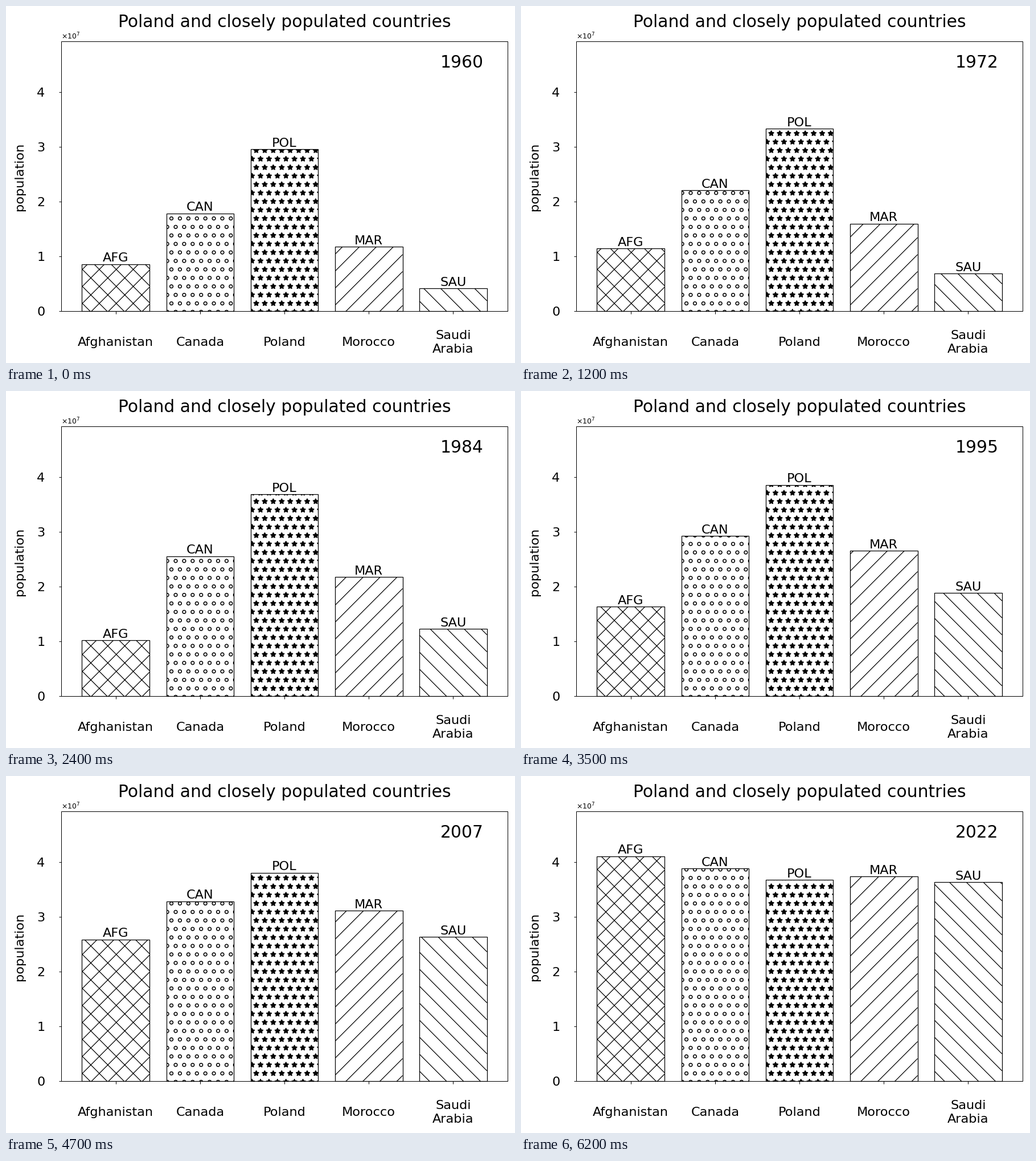
A matplotlib script that plays this animation: 894x626 px, repeating every 6300 ms.

```python
import matplotlib.pyplot as plt
import numpy as np
from matplotlib.animation import FuncAnimation
from matplotlib.patches import PathPatch, Rectangle
from matplotlib.path import Path

W, H, DPI = 894, 626, 64
SCALE = 89.4               # pixels per inch of the layout
PT = SCALE / DPI           # layout points to figure points
LEFT, RIGHT, TOP, BASE = 97.4, 880.9, H - 61.7, H - 535.35
FIRST_BAR, STEP, BAR_W = 133.35, 148.2, 118.6
PER_MILLION = 9.6
CELL = SCALE / 6           # spacing of the hatch grid
FIRST_YEAR, FRAMES = 1960, 63
KEY_YEARS = [1960, 1966, 1977, 1984, 1995, 2007, 2015, 2022]


def smooth(x, xs, ys):
    """Monotone cubic through the points, flat at their peaks and dips."""
    xs, ys = np.array(xs, float), np.array(ys, float)
    slope = np.diff(ys) / np.diff(xs)
    a, b = slope[:-1], slope[1:]
    same = a * b > 0
    inner = np.where(same, 2 * a * b / np.where(same, a + b, 1), 0)
    tangent = np.concatenate([slope[:1], inner, slope[-1:]])
    i = np.clip(np.searchsorted(xs, x, side="right") - 1, 0, len(xs) - 2)
    step = xs[i + 1] - xs[i]
    t = (x - xs[i]) / step
    ease = t * t * (3 - 2 * t)
    return (ys[i] + (ys[i + 1] - ys[i]) * ease
            + step * t * (1 - t) * ((1 - t) * tangent[i] - t * tangent[i + 1]))


def diagonals(left, slope):
    """Parallel 45 degree lines over the whole column."""
    x = np.array([left, left + BAR_W])
    lines = []
    for k in range(-40, 70):
        y = H + slope * x - 2 * CELL * k
        if y.max() > BASE and y.min() < TOP:
            lines.append(Path(np.column_stack([x, y])))
    return lines


def grid_of(left, shape, radius):
    """Copies of a unit shape on a staggered grid."""
    first, last = int(left / CELL) - 1, int((left + BAR_W) / CELL) + 2
    copies = []
    for row in range(4, 37):
        for col in range(first, last):
            center = ((col + row % 2 / 2) * CELL, H - row * CELL)
            copies.append(Path(shape.vertices * radius + center, shape.codes))
    return copies


def slashes(left):
    return diagonals(left, 1)


def backslashes(left):
    return diagonals(left, -1)


def crosses(left):
    return slashes(left) + backslashes(left)


def rings(left):
    return grid_of(left, Path.unit_circle(), 0.19 * CELL)


def stars(left):
    return grid_of(left, Path.unit_regular_star(5), CELL / 3)


# name, code, millions in the key years, further turning points, pattern
COUNTRIES = [
    ("Afghanistan", "AFG", [8.6, 9.8, 12.7, 10.2, 16.4, 25.9, 33.8, 41.1],
     {1979: 13, 1982: 10, 1991: 10.7, 2002: 21}, crosses),
    ("Canada", "CAN", [17.9, 20, 23.7, 25.6, 29.3, 32.9, 35.7, 38.9],
     {}, rings),
    ("Poland", "POL", [29.6, 31.7, 34.7, 36.9, 38.6, 38.1, 38, 36.8],
     {}, stars),
    ("Morocco", "MAR", [11.8, 13.7, 18.2, 21.8, 26.6, 31.2, 34.6, 37.4],
     {}, slashes),
    ("Saudi\nArabia", "SAU", [4.2, 5.2, 8.7, 12.3, 18.9, 26.4, 32.7, 36.4],
     {}, backslashes),
]

plt.rcParams["font.family"] = "DejaVu Sans"
fig = plt.figure(figsize=(W / DPI, H / DPI), dpi=DPI, facecolor="white")
ax = fig.add_axes([0, 0, 1, 1])
ax.set(xlim=(0, W), ylim=(0, H))
ax.axis("off")


def label(x, y, text, size=18, **kw):
    """Text placed by pixels from the top left corner."""
    kw = {"ha": "center", "va": "baseline", **kw}
    return ax.text(x, H - y, text, fontsize=size * PT, color="black", **kw)


def line(xs, ys):
    ax.plot(xs, ys, color="black", lw=0.8 * PT, zorder=4,
            solid_capstyle="butt")


class Bar:
    def __init__(self, index, name, code, millions, turns, pattern):
        left = FIRST_BAR + index * STEP
        knots = sorted({**dict(zip(KEY_YEARS, millions)), **turns}.items())
        self.years, self.millions = zip(*knots)
        self.rect = Rectangle((left, BASE), BAR_W, 1, fill=False, ec="black",
                              lw=PT, zorder=3)
        width = 1.24 if pattern is rings else 1
        self.hatch = PathPatch(Path.make_compound_path(*pattern(left)),
                               fc="black" if pattern is stars else "none",
                               ec="black", lw=width * PT, joinstyle="miter",
                               capstyle="butt", zorder=2)
        ax.add_patch(self.rect)
        ax.add_patch(self.hatch)
        middle = left + BAR_W / 2
        self.code = label(middle, 0, code)
        label(middle, 590, name, va="center")
        line([middle] * 2, [BASE, BASE - 4.35])

    def show(self, year):
        height = PER_MILLION * smooth(year, self.years, self.millions)
        self.rect.set_height(height)
        self.hatch.set_clip_path(self.rect)
        self.code.set_y(BASE + height + 4.3)


bars = [Bar(i, *country) for i, country in enumerate(COUNTRIES)]

ax.add_patch(Rectangle((LEFT, BASE), RIGHT - LEFT, TOP - BASE, fill=False,
                       ec="black", lw=0.8 * PT, zorder=4))
for tick in range(5):
    y = BASE + 10 * PER_MILLION * tick
    line([LEFT - 4.35, LEFT], [y, y])
    label(68.4, H - y, str(tick), ha="right", va="center_baseline")

label((LEFT + RIGHT) / 2, 37, "Poland and closely populated countries", 24)
label(LEFT, 58, r"$\times\mathdefault{10^{7}}$", 10, ha="left")
label(24.5, 299.5, "population", rotation=90, va="center")
year_text = label(762.5, 108.5, "", 24, ha="left")


def update(frame):
    year = FIRST_YEAR + frame
    for bar in bars:
        bar.show(year)
    year_text.set_text(str(year))
    return []


anim = FuncAnimation(fig, update, frames=FRAMES, interval=100, repeat=True,
                     repeat_delay=0, blit=False)
plt.show()
```
